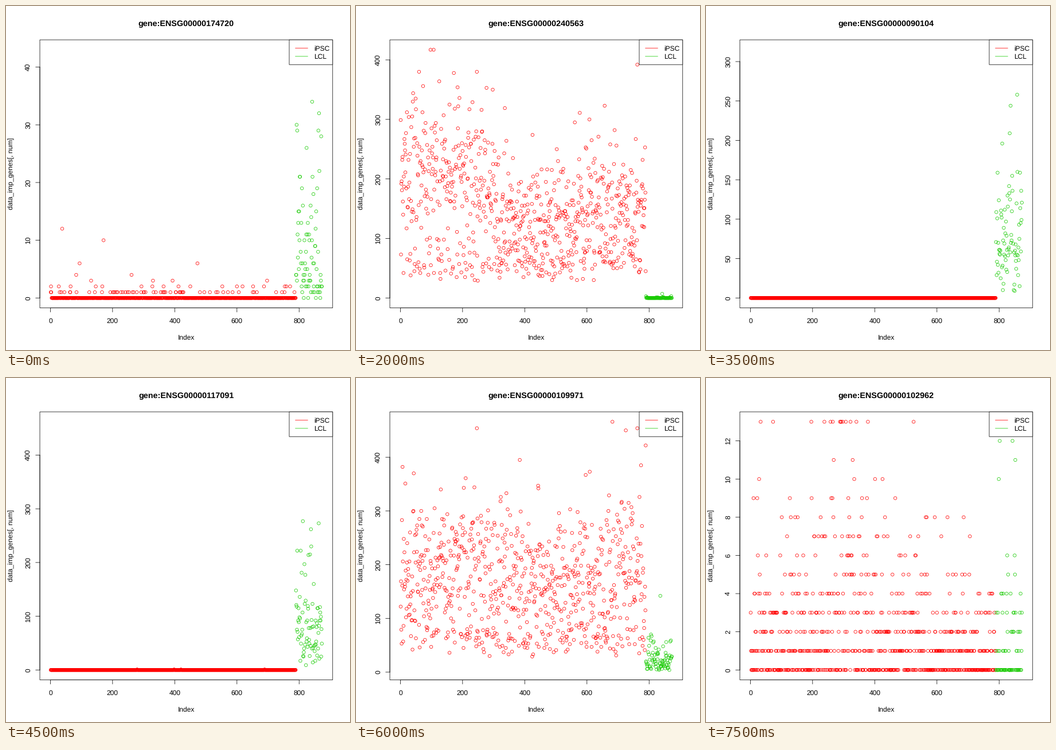
Recreate the animation shown at these times as a matplotlib script. Size 600 by 600 pixels, loop 8000 ms.

```python
import matplotlib.pyplot as plt
import numpy as np
from matplotlib.animation import FuncAnimation
from matplotlib.patches import Rectangle

plt.rcParams["font.family"] = "Liberation Sans"
plt.rcParams["text.hinting"] = "none"

SIZE, DPI = 600, 72
LEFT, RIGHT, TOP, BOTTOM = 59.04, 569.76, 59.04, 526.56
LINE = 14.4  # height of one margin line
TICK = LINE / 2
N_RED, N_GREEN = 789, 84
N = N_RED + N_GREEN
RED, GREEN, BLACK = "#ff0000", "#1acb05", "#000000"
INDEX = np.arange(1, N + 1)


def trend(values, n):
    """Spread a few levels evenly over n samples."""
    values = np.atleast_1d(values)
    return np.interp(np.linspace(0, 1, n),
                     np.linspace(0, 1, len(values)), values)


def counts(mean, shape=2, floor=0):
    """Overdispersed read counts; a small shape gives a long tail."""
    def sample(rng, n):
        return floor + rng.poisson(rng.gamma(shape, trend(mean, n) / shape))
    return sample


def cloud(levels, spread, low=0.18, floor=28):
    """Noise around a trend, with a share of samples in a low band."""
    def sample(rng, n):
        mid = trend(levels, n)
        values = mid + spread * rng.standard_t(9, n)
        band = np.mean(mid) * rng.normal(0.34, 0.1, n)
        values = np.where(rng.random(n) < low, band, values)
        return np.where(values < floor, floor * rng.uniform(1, 3, n), values)
    return sample


off = counts(0)

# gene number, tick step, iPSC rule, LCL rule, highest points {index: value}
GENES = [
    ("00000174720", 10, counts(0.2, 0.2), counts(7.5, 1.1),
     {38: 12, 171: 10, 842: 34, 850: 43}),
    ("00000163794", 50, counts(0.03), counts(60), {850: 240}),
    ("00000117450", 100, cloud((295, 295, 275, 235, 290, 185, 290), 66),
     counts(27, 1.6, 3),
     {199: 506, 246: 513, 746: 597, 762: 621, 767: 545, 870: 122}),
    ("00000148253", 100, cloud((230, 250, 190, 230, 190, 230), 60),
     counts(15, 2, 6), {246: 450, 762: 480}),
    ("00000240563", 100, cloud((220, 220, 185, 130, 145, 165, 165), 54),
     counts(0.1, 0.2), {107: 417, 172: 378, 246: 380, 762: 392, 842: 7}),
    ("00000136918", 20, counts(0.05), counts(30), {850: 110}),
    ("00000105482", 50, counts(0.01), counts(70), {850: 260}),
    ("00000090104", 50, off, counts(85, 2.2),
     {837: 244, 846: 315, 858: 258}),
    ("00000128367", 50, counts(0.01), counts(65), {850: 290}),
    ("00000117091", 100, counts(0.006), counts(85, 2.6),
     {838: 262, 848: 462, 863: 273}),
    ("00000143816", 20, counts(0.04), counts(35), {850: 130}),
    ("00000115629", 100, cloud((200, 220, 170, 200, 170, 200), 58),
     counts(12), {246: 440, 762: 420}),
    ("00000109971", 100, cloud((175, 195, 215, 165, 165, 185, 190), 66),
     counts(22, 1.3, 4),
     {7: 382, 246: 454, 682: 466, 725: 450, 762: 454, 836: 142}),
    ("00000171345", 50, counts(0.02), counts(60), {850: 230}),
    ("00000132870", 10, counts(0.1, 0.3), counts(12), {850: 48}),
    ("00000102962", 2, counts((2, 2, 3.2, 2.6, 1.7, 1.2, 1.2), 0.95),
     counts(2.2, 0.35), {73: 13, 196: 13, 322: 13, 525: 13}),
]


def simulate(seed, red, green, peaks):
    rng = np.random.default_rng(seed)
    data = np.concatenate([red(rng, N_RED), green(rng, N_GREEN)])
    data = np.minimum(np.round(data), max(peaks.values()))
    for i, v in peaks.items():
        data[i - 1] = v
    return data


SERIES = [simulate(40 + k, *gene[2:]) for k, gene in enumerate(GENES)]

fig = plt.figure(figsize=(SIZE / DPI, SIZE / DPI), dpi=DPI, facecolor="white")
ax = fig.add_axes([0, 0, 1, 1])
ax.set_xlim(0, SIZE)
ax.set_ylim(SIZE, 0)
ax.axis("off")


def line(xs, ys, color=BLACK, z=2):
    return ax.plot(xs, ys, color=color, lw=0.75, snap=False, zorder=z)[0]


def label(x, y, text, size=12, **kw):
    kw = {"ha": "center", "va": "baseline", "rotation_mode": "anchor",
          "zorder": 5, **kw}
    return ax.text(x, y, text, fontsize=size, **kw)


def frame_box(x, y, w, h, fill, z):
    ax.add_patch(Rectangle((x, y), w, h, fc=fill, ec=BLACK, lw=0.75,
                           snap=False, zorder=z))


def scale(v, lo, hi, start, end):
    """Map lo..hi to start..end with 4% padding on both sides."""
    pad = 0.04 * (hi - lo)
    return start + (v - lo + pad) / (hi - lo + 2 * pad) * (end - start)


def x_pos(i):
    return scale(i, 1, N, LEFT, RIGHT)


def y_pos(v, lo, hi):
    return scale(v, lo, hi, BOTTOM, TOP)


frame_box(LEFT, TOP, RIGHT - LEFT, BOTTOM - TOP, "none", 2)
line([x_pos(0), x_pos(800)], [BOTTOM, BOTTOM])
for i in range(0, 801, 200):
    line([x_pos(i)] * 2, [BOTTOM, BOTTOM + TICK])
    label(x_pos(i), 553, str(i))
mid_x, mid_y = (LEFT + RIGHT) / 2, (TOP + BOTTOM) / 2
label(mid_x, 582, "Index")
label(13, mid_y, "data_imp_genes[, num]", rotation=90)
title = label(mid_x, 35, "", 14.4, weight="bold")

frame_box(494, TOP, RIGHT - 494, 3 * LINE, "white", 3)
for k, (name, color) in enumerate([("iPSC", RED), ("LCL", GREEN)]):
    y = TOP + LINE * (k + 1)
    line([504.7, 526.3], [y, y], color, 4)
    label(537, y + 4.3, name, ha="left")

dots = ax.scatter(x_pos(INDEX), np.zeros(N), s=5.4 ** 2, facecolors="none",
                  edgecolors=[RED] * N_RED + [GREEN] * N_GREEN,
                  linewidths=0.75, zorder=1)
y_axis = []


def draw(k):
    number, step = GENES[k][:2]
    data = SERIES[k]
    lo, hi = data.min(), data.max()
    dots.set_offsets(np.column_stack([x_pos(INDEX), y_pos(data, lo, hi)]))
    title.set_text("gene:ENSG" + number)
    while y_axis:
        y_axis.pop().remove()
    ticks = np.arange(0, hi + 0.04 * (hi - lo), step)
    y_axis.append(line([LEFT, LEFT], y_pos(ticks[[0, -1]], lo, hi)))
    for v in ticks:
        y = y_pos(v, lo, hi)
        y_axis.append(line([LEFT - TICK, LEFT], [y, y]))
        y_axis.append(label(42, y, f"{v:.0f}", rotation=90))
    return [dots, title, *y_axis]


anim = FuncAnimation(fig, draw, frames=len(GENES), interval=500,
                     repeat=True, repeat_delay=0, blit=False)
plt.show()
```
